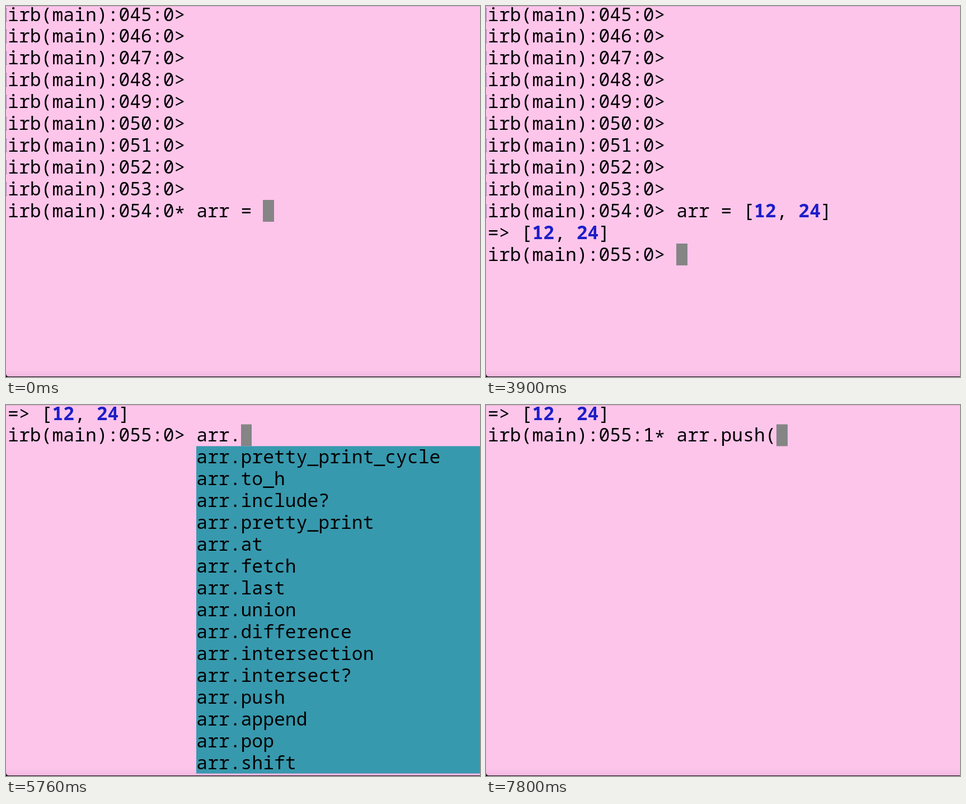
These frames come from a looping animation (847 by 662 pixels, 8000 ms). An HTML page with a canvas:

```html
<!DOCTYPE html>
<html lang="en">
<head>
<meta charset="utf-8">
<title>Terminal session</title>
<style>
  html, body { margin: 0; width: 100%; height: 100%; overflow: hidden; background: #fec5eb; }
  canvas { display: block; }
</style>
</head>
<body>
<canvas id="stage" width="847" height="662"></canvas>
<script>
const WIDTH = 847, HEIGHT = 662, LOOP = 8000;
const CELL = 19.83, ROW = 38.94, LEFT = 3.1, TOP = -4.45, BASELINE = 31;
const PROMPT_COLS = 17;
const FONT = '33.05px "Noto Sans Mono", "DejaVu Sans Mono", monospace';
const PINK = '#fec5eb', TEAL = '#3799ae', GREY = '#858585', BLUE = '#1d1dc8';
const ctx = document.getElementById('stage').getContext('2d');

const methods = names => names.split(' ').map(name => 'arr.' + name);
const KEYWORDS = 'at_exit autoload autoload? abort arr alias and'.split(' ');
const ALL = methods('pretty_print_cycle to_h include? pretty_print at fetch last union ' +
  'difference intersection intersect? push append pop shift');
const P_METHODS = methods('pretty_print_cycle pretty_print push pop product pack permutation ' +
  'prepend partition pretty_print_inspect pretty_print_instance_variables ' +
  'protected_methods private_methods public_methods public_send');
const PU_METHODS = methods('push public_methods public_send public_method');

// Each step: start time, prompt number, prompt state, typed text, scrolled rows, suggestions
const STEPS = [
  [0, 54, '0*', 'arr = ', 0],
  [730, 54, '1*', 'arr = [', 0],
  [1160, 54, '1*', 'arr = [1', 0],
  [1400, 54, '1*', 'arr = [12', 0],
  [1800, 54, '1*', 'arr = [12,', 0],
  [1960, 54, '1*', 'arr = [12, ', 0],
  [2830, 54, '1*', 'arr = [12, 2', 0],
  [3000, 54, '1*', 'arr = [12, 24', 0],
  [3600, 54, '0>', 'arr = [12, 24]', 0],
  [3860, 55, '', '', 0],
  [3900, 55, '0>', '', 0],
  [5300, 55, '0>', 'a', 2, KEYWORDS],
  [5500, 55, '0>', 'ar', 2, ['arr']],
  [5600, 55, '0>', 'arr', 2],
  [5760, 55, '0>', 'arr.', 10, ALL],
  [6330, 55, '0>', 'arr.p', 10, P_METHODS],
  [6500, 55, '0>', 'arr.pu', 10, PU_METHODS],
  [6600, 55, '0>', 'arr.pus', 10, ['arr.push']],
  [6760, 55, '0>', 'arr.push', 10],
  [7800, 55, '1*', 'arr.push(', 10]
];

const colX = col => LEFT + col * CELL;
const rowY = row => TOP + row * ROW;

function fillCells(col, row, cols, rows, color) {
  const x = Math.round(colX(col));
  ctx.fillStyle = color;
  ctx.fillRect(x, rowY(row), Math.round(colX(col + cols)) - x, rows * ROW);
}

function write(text, col, row, color = '#000', weight = 500, dy = 0) {
  ctx.font = `${weight} ${FONT}`;
  ctx.fillStyle = color;
  ctx.fillText(text, colX(col), rowY(row) + BASELINE + dy);
}

function writeCode(code, col, row) {
  for (const part of code.split(/(\d+)/)) {
    if (/\d/.test(part)) write(part, col, row, BLUE, 700);
    else write(part, col, row);
    col += part.length;
  }
}

function writePrompt(number, state, row) {
  const prompt = `irb(main):0${number}:${state}`;
  write(prompt.replace('*', ''), 0, row);
  // The terminal centres the asterisk on the lowercase letters.
  if (state.endsWith('*')) write('*', prompt.length - 1, row, '#000', 500, 5);
}

function drawMark(row) {
  const y = Math.round(rowY(row) + 8);
  ctx.fillStyle = 'rgba(85, 75, 125, .5)';
  ctx.fillRect(0, y, 1, 24);
  ctx.fillRect(1, y, 1, 1);
  ctx.fillRect(1, y + 23, 1, 1);
}

function drawPopup(items, row) {
  const clipped = items.length === 15;
  const cols = clipped ? 35 : Math.max(...items.map(item => item.length));
  fillCells(PROMPT_COLS, row, cols, items.length, TEAL);
  items.forEach((item, i) => write(item, PROMPT_COLS, row + i));
}

function drawWindow() {
  ctx.fillStyle = PINK;
  ctx.fillRect(0, 0, WIDTH, HEIGHT);
  const shade = ctx.createLinearGradient(0, 648, 0, 661);
  shade.addColorStop(0, 'rgba(90, 20, 75, 0)');
  shade.addColorStop(1, 'rgba(90, 20, 75, .07)');
  ctx.fillStyle = shade;
  ctx.fillRect(0, 648, WIDTH, 13);
  ctx.fillStyle = '#d9a9ca';
  ctx.fillRect(0, 0, WIDTH, 1);
}

function drawWindowEdge() {
  ctx.fillStyle = '#1c101a';
  ctx.fillRect(0, 661, WIDTH, 1);
  ctx.fillStyle = '#000';
  ctx.beginPath();
  ctx.moveTo(0, 656);
  ctx.quadraticCurveTo(0, 661, 6, 661.5);
  ctx.lineTo(0, HEIGHT);
  ctx.fill();
}

function draw(time) {
  const [, number, state, typed, scroll, popup] = STEPS.findLast(step => step[0] <= time);
  drawWindow();

  for (let n = 45; n < number; n++) {
    const row = n - 45 - scroll;
    if (row < 0) continue;
    writePrompt(n, '0>', row);
    drawMark(row);
    if (n === 54) writeCode('arr = [12, 24]', PROMPT_COLS, row);
  }

  const inputRow = (number === 54 ? 9 : 11) - scroll;
  if (number === 55) writeCode('=> [12, 24]', 0, inputRow - 1);
  if (state) {
    writePrompt(number, state, inputRow);
    writeCode(typed, PROMPT_COLS, inputRow);
  }
  fillCells(state ? PROMPT_COLS + typed.length : 0, inputRow, 1, 1, GREY);
  if (popup) drawPopup(popup, inputRow + 1);
  drawWindowEdge();
}

const start = performance.now();
function tick() {
  draw((performance.now() - start) % LOOP);
  requestAnimationFrame(tick);
}
tick();
</script>
</body>
</html>
```
